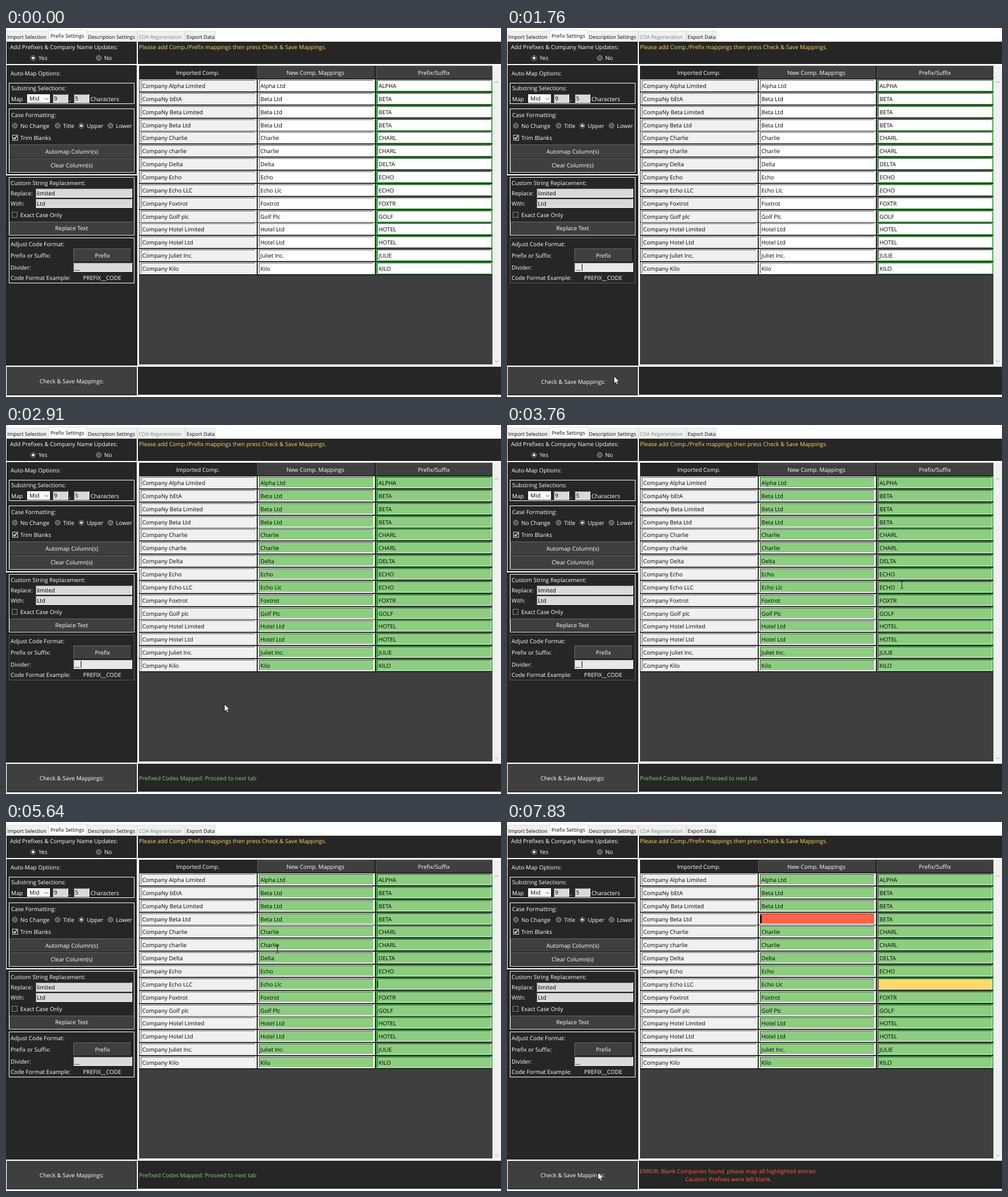
Write an HTML page that moves like this. It is 867 px wide and 646 px high and loops after 8 s.

```html
<!DOCTYPE html>
<html lang="en">
<head>
<meta charset="utf-8">
<title>Prefix settings</title>
<style>
  html, body { margin: 0; height: 100%; overflow: hidden; background: #fff; }
  svg { display: block; width: 867px; height: 646px; --green: #8ccd80; }
  text { font: 9.95px "Open Sans", "Noto Sans", sans-serif; fill: #fff; white-space: pre; text-rendering: geometricPrecision; }
  text.tab { font-size: 8.9px; fill: #000; }
  text.ink { fill: #000; }
  .mid { text-anchor: middle; }
  .cell { fill: #fff; }
  .cell.read { fill: #f0f0f0; }
  .saved .cell:not(.read) { fill: var(--green); }
  .failed #new3 { fill: #ff6347; }
  .failed #code8 { fill: #ffd966; }
  .good { fill: var(--green); }
  .bad { fill: #ff6347; }
  .focused #adjust { stroke: #5a5a5a; }
  .focused #divider { fill: #e8e8e8; }
  .pressed #save text { transform: translate(1px, 1px); }
</style>
</head>
<body>
<svg id="stage" viewBox="0 0 867 646"></svg>
<script>
const DARK = '#262626', GREY = '#3f3f3f', LIGHT = '#f0f0f0';
const ROWS = [
  ['Company Alpha Limited', 'Alpha Ltd', 'ALPHA'],
  ['CompaNy bEtA', 'Beta Ltd', 'BETA'],
  ['CompaNy Beta Limited', 'Beta Ltd', 'BETA'],
  ['Company Beta Ltd', 'Beta Ltd', 'BETA'],
  ['Company Charlie', 'Charlie', 'CHARL'],
  ['Company charlie', 'Charlie', 'CHARL'],
  ['Company Delta', 'Delta', 'DELTA'],
  ['Company Echo', 'Echo', 'ECHO'],
  ['Company Echo LLC', 'Echo Llc', 'ECHO'],
  ['Company Foxtrot', 'Foxtrot', 'FOXTR'],
  ['Company Golf plc', 'Golf Plc', 'GOLF'],
  ['Company Hotel Limited', 'Hotel Ltd', 'HOTEL'],
  ['Company Hotel Ltd', 'Hotel Ltd', 'HOTEL'],
  ['Company Juliet Inc.', 'Juliet Inc.', 'JULIE'],
  ['Company Kilo', 'Kilo', 'KILO']
];
const COLUMNS = [
  { name: 'old', x: 234, w: 205, edge: '#fff', kind: 'cell read' },
  { name: 'new', x: 441, w: 205, edge: '#fff', kind: 'cell' },
  { name: 'code', x: 648, w: 204, edge: '#45b549', kind: 'cell' }
];

const rect = (x, y, w, h, fill, extra = '') =>
  `<rect x="${x}" y="${y}" width="${w}" height="${h}" fill="${fill}" ${extra}/>`;
const line = (d, color, extra = '') => `<path d="${d}" fill="none" stroke="${color}" ${extra}/>`;
// y is the middle of the capitals
const text = (x, y, s, kind = '', extra = '') =>
  `<text x="${x}" y="${y + 3.6}" class="${kind}" ${extra}>${s.replace(/&/g, '&amp;')}</text>`;
const box = (x, y, w, h, extra = '') =>
  rect(x + .5, y + .5, w - 1, h - 1, 'none', `stroke="#fff" ${extra}`);
const bevel = (x, y, w, h, top, bottom) =>
  line(`M${x + .5} ${y + h - 1}V${y + .5}H${x + w - 1}`, top) +
  line(`M${x + .5} ${y + h - .5}H${x + w - .5}V${y}`, bottom);
const button = (x, y, w, h, s) =>
  rect(x, y, w, h, GREY) + bevel(x, y, w, h, '#6a6a6a', '#151515') + text(x + w / 2, y + h / 2, s, 'mid');
const entry = (x, y, w, h, s, extra = '') =>
  rect(x, y, w, h, '#d9d9d9', extra) + bevel(x, y, w, h, '#777', '#fff') + text(x + 2, y + h / 2, s, 'ink');
const radio = (x, y, s, gap, on) =>
  `<circle cx="${x}" cy="${y}" r="4.3" fill="${on ? DARK : '#555'}" stroke="#a0a0a0"/>` +
  (on ? `<circle cx="${x}" cy="${y}" r="2.3" fill="#fff"/>` : '') + text(x + gap, y, s);
const check = (x, y, s, on) =>
  rect(x + .5, y + .5, 9, 9, DARK, `stroke="${on ? '#ddd' : '#888'}"`) +
  (on ? line(`M${x + 2} ${y + 5}l2 2.3 4-5`, '#fff', 'stroke-width="1.5"') : '') + text(25, y + 5.5, s);

function tabs() {
  const tab = (x, w, s) => rect(x + .5, 5.5, w - 1, 18, LIGHT, 'stroke="#dcdcdc"') + text(x + 2.5, 15, s, 'tab',
    s.startsWith('COA') ? 'style="fill:#788480"' : '');
  return tab(0, 75, 'Import Selection') + tab(141, 89, 'Description Settings') +
    tab(230, 84, 'COA Regeneration') + tab(314, 53, 'Export Data') +
    rect(74.5, 3.5, 67, 20, '#fff', 'stroke="#dcdcdc"') + text(78, 13.5, 'Prefix Settings', 'tab');
}

function sidePanel() {
  return rect(1, 24, 228, 39, DARK) + rect(1, 65, 228, 191, DARK) + rect(0, 258, 230, 333, DARK) +
    text(7, 33.5, 'Add Prefixes & Company Name Updates:') +
    radio(47.5, 52.5, 'Yes', 9.5, true) + radio(162.5, 52.5, 'No', 9.5) +
    text(8, 79, 'Auto-Map Options:') +
    box(5, 96, 220, 37) + text(9, 105.5, 'Substring Selections:') + text(9, 124, 'Map') +
    rect(37, 116, 40, 15, '#fff') + text(41, 123.5, 'Mid', 'ink') + line('M68 122.5l3 3 3-3', '#444') +
    entry(82, 116, 27, 15, '9') + text(111, 124, ',') + entry(119, 116, 27, 15, '5') + text(148, 124, 'Characters') +
    box(5, 141, 220, 112) + text(9, 152, 'Case Formatting:') +
    radio(15.5, 171, 'No Change', 9.5) + radio(90.5, 171, 'Title', 9.5) +
    radio(132, 171, 'Upper', 9.5, true) + radio(183, 171, 'Lower', 9.5) +
    check(11, 187, 'Trim Blanks', true) +
    button(6, 204, 218, 24, 'Automap Column(s)') + button(6, 228, 218, 24, 'Clear Column(s)') +
    box(5, 261, 220, 102) + text(8, 271.5, 'Custom String Replacement:') +
    text(8, 289.5, 'Replace:') + entry(52, 281, 169, 16, 'limited') +
    text(8, 307.5, 'With:') + entry(52, 299, 169, 16, 'Ltd') +
    check(10, 322, 'Exact Case Only') + button(6, 339, 218, 23, 'Replace Text') +
    box(5, 367, 220, 80, 'id="adjust"') + text(8, 378, 'Adjust Code Format:') +
    text(8, 398, 'Prefix or Suffix:') + button(118, 386, 102, 24, 'Prefix') +
    text(8, 419.5, 'Divider:') + entry(118, 411, 103, 16, '__', 'id="divider"') +
    text(8, 437.5, 'Code Format Example:') + text(135, 437.5, 'PREFIX__CODE') +
    `<g id="save">${button(1, 593, 228, 50, 'Check & Save Mappings:')}</g>`;
}

function cell(col, row, i) {
  const { x, w, name, edge, kind } = COLUMNS[col], y = Math.round(90 + i * 22.86);
  return rect(x, y, w, 21, edge) +
    rect(x + 2, y + 1, w - 4, 19, '#fff', `class="${kind}" id="${name}${i}"`) +
    bevel(x + 2, y + 1, w - 4, 19, '#4a4a4a', '#e6e6e6') +
    text(x + 4.5, y + 11, row[col], 'ink', `id="${name}Text${i}"`);
}

function table() {
  return rect(231, 24, 636, 39, DARK) +
    text(233, 33.5, 'Please add Comp./Prefix mappings then press Check & Save Mappings.', '', 'style="fill:#ffd966"') +
    rect(233, 66, 619, 523, DARK) + rect(852, 66, 15, 523, LIGHT) +
    rect(440, 67, 205, 21, GREY) + rect(648, 67, 204, 21, GREY) +
    line('M440.5 88V67.5H645M648.5 88V67.5H852', '#5c5c5c') +
    text(336, 78, 'Imported Comp.', 'mid') + text(542, 78, 'New Comp. Mappings', 'mid') +
    text(749.5, 78.5, 'Prefix/Suffix', 'mid') +
    rect(233, 433, 619, 156, GREY) +
    line('M856.5 96l3-3 3 3M856.5 582l3 3 3-3', '#999') +
    ROWS.map((row, i) => COLUMNS.map((_, c) => cell(c, row, i)).join('')).join('');
}

function overlays() {
  return rect(231, 593, 636, 49, DARK) +
    text(233, 618, 'Prefixed Codes Mapped: Proceed to next tab', 'good', 'id="okNote"') +
    `<g id="errorNote">${text(388, 611.5, 'ERROR: Blank Companies found, please map all highlighted entries.', 'mid bad')}` +
    text(388, 625.5, 'Caution: Prefixes were left blank.', 'mid bad') + '</g>' +
    `<g id="pickCode">${rect(652, 277, 27, 14, '#0078d7')}${text(652.5, 284, 'ECHO')}</g>` +
    `<g id="pickNew">${rect(445, 163, 39, 13, '#0078d7')}${text(445.5, 170, 'Beta Ltd')}</g>` +
    rect(131, 413, 1, 12, '#000', 'id="dividerCaret"') +
    rect(650, 278, 1.5, 12, '#000', 'id="codeCaret"') +
    rect(444, 163, 2, 14, '#000', 'id="newCaret"') +
    '<path id="arrow" d="M0 0V13L3 10.3L5 15L7.2 14L5.2 9.5H9.2Z" fill="#fff" stroke="#000" stroke-width=".8"/>' +
    line('M-3 -6.5H-1L0 -5.5L1 -6.5H3M0 -5.5V5.5M-3 6.5H-1L0 5.5L1 6.5H3', '#222', 'id="beam"');
}

const stage = document.getElementById('stage');
stage.innerHTML = rect(0, 0, 867, 646, '#fff') + tabs() + sidePanel() + table() + overlays();

// pointer path: time, x, y; a repeated place is a rest
const PATH = [
  [230, 815, 638], [420, 560, 598], [600, 360, 569], [760, 250, 560], [920, 213, 577],
  [1060, 205, 585], [1510, 187, 609], [2490, 187, 609], [2650, 222, 586], [2800, 305, 535],
  [2950, 410, 472], [3090, 508, 417], [3280, 612, 335], [3640, 676, 292], [3760, 691, 279],
  [3920, 694, 275], [4090, 694, 275], [4380, 606, 288], [4710, 606, 288], [4880, 588, 301],
  [5060, 553, 289], [5200, 531, 284], [5400, 482, 257], [5510, 475, 246], [5640, 475, 222],
  [5900, 483, 192], [6230, 487, 174], [6400, 487, 174], [6600, 432, 186], [6810, 314, 287],
  [7000, 224, 470], [7180, 176, 580], [7420, 159, 613], [8000, 159, 613]
];

// smooth speed through the points, standing still at rests
function pointAt(t) {
  const i = PATH.findIndex(p => p[0] > t), a = PATH[i - 1], b = PATH[i];
  const span = b[0] - a[0], k = (t - a[0]) / span;
  const same = (p, q) => !p || !q || (p[1] === q[1] && p[2] === q[2]);
  const slope = (n, axis) => {
    const [p, q, r] = [PATH[n - 1], PATH[n], PATH[n + 1]];
    return same(p, q) || same(q, r) ? 0 : (r[axis] - p[axis]) / (r[0] - p[0]) * span;
  };
  return [1, 2].map(axis => {
    const ease = k * k * (3 - 2 * k);
    return a[axis] + (b[axis] - a[axis]) * ease +
      slope(i - 1, axis) * k * (1 - k) ** 2 - slope(i, axis) * k * k * (1 - k);
  });
}

const part = id => document.getElementById(id);
const show = (id, on) => { part(id).style.display = on ? '' : 'none'; };
const blink = (t, start) => (t - start) % 900 < 600;
const within = (t, a, b) => t >= a && t < b;

// text is selected leftwards from its end as the pointer drags over it
function drag(id, on, hidden) {
  show(id, on);
  part(id).style.clipPath = `inset(0 0 0 ${Math.max(0, hidden)}px)`;
}

function draw(t) {
  const saved = t >= 1830, failed = t >= 7790;
  stage.classList.toggle('saved', saved);
  stage.classList.toggle('failed', failed);
  stage.classList.toggle('focused', within(t, 1760, 4130));
  stage.classList.toggle('pressed', within(t, 1760, 1830) || within(t, 7750, 7790));
  show('okNote', saved && !failed);
  show('errorNote', failed);

  const moving = t >= 230, [x, y] = moving ? pointAt(t) : [0, 0];
  drag('pickCode', within(t, 4090, 4710) && x < 679, x - 652);
  show('codeText8', t < 4710);
  drag('pickNew', within(t, 6400, 7050) && x < 484, x - 445);
  show('newText3', t < 7050);
  show('dividerCaret', within(t, 1760, 4130) && blink(t, 1730));
  show('codeCaret', within(t, 4710, 7790) && (t >= 6400 || blink(t, 4710)));
  show('newCaret', t >= 6400 && blink(t, 6400));

  const typing = x > 234 && y < 432;
  show('arrow', moving && !typing);
  show('beam', moving && typing);
  part(typing ? 'beam' : 'arrow')
    .setAttribute('transform', `translate(${Math.round(x) + .5} ${Math.round(y) + .5})`);
}

const start = performance.now();
function tick() {
  draw((performance.now() - start) % 8000);
  requestAnimationFrame(tick);
}
tick();
</script>
</body>
</html>
```
